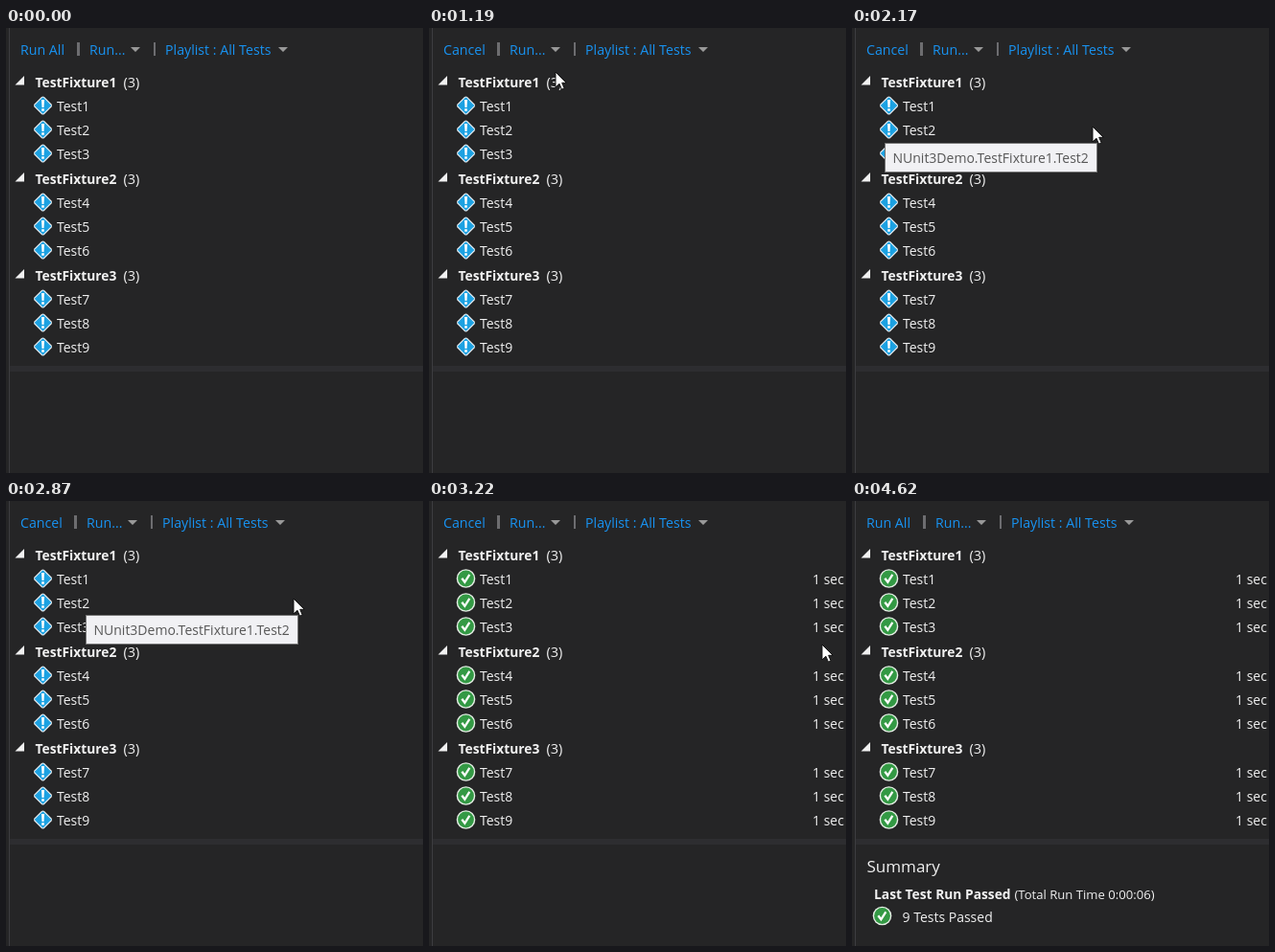
An HTML page that plays this animation: 435x465 px, repeating every 5670 ms.

```html
<!DOCTYPE html>
<html lang="en">
<head>
<meta charset="utf-8">
<title>Test explorer</title>
<style>
html, body { margin: 0; width: 100%; height: 100%; overflow: hidden; background: #252526; }
svg { display: block; font: 14px "Open Sans", "Noto Sans", sans-serif; fill: #f1f1f1; }
.bold { font-weight: 700; font-size: 13.8px; }
.link { font-size: 14.2px; fill: #1893f2; }
.link.hover { fill: #fff; }
.grey { fill: #999; }
</style>
</head>
<body>
<svg width="435" height="465" viewBox="0 0 435 465">
  <defs>
    <g id="pending">
      <path d="M-1.5-9Q0-10 1.5-9L9-1.5Q10 0 9 1.5L1.5 9Q0 10-1.5 9L-9 1.5Q-10 0-9-1.5Z" fill="#e4eef4"/>
      <path d="M0-8.2 8.2 0 0 8.2-8.2 0Z" fill="#1ba1e2" stroke="#1ba1e2" stroke-linejoin="round"/>
      <path d="M-1.5-6h3L1 2h-2ZM-1.3 3.2h2.6v2.6h-2.6Z" fill="#fff"/>
    </g>
    <g id="passed">
      <circle r="9.8" fill="#e6efe6"/>
      <circle r="8.4" fill="#339944"/>
      <path d="M-4.2-.2-1.2 3.8 3.8-4.2" fill="none" stroke="#fff" stroke-width="2.3"/>
    </g>
  </defs>
  <rect width="435" height="465" fill="#252526"/>
  <rect x="3" width="1" height="465" fill="#3d3d40"/>
  <rect x="4" y="353" width="431" height="6" fill="#2d2d30"/>

  <text id="action" class="link" x="15" y="28"></text>
  <g id="menu">
    <path d="M74 15h3v14h-3ZM154 15h2v14h-2Z" fill="#6d6d70"/>
    <text class="link" x="87" y="28">Run...</text>
    <text class="link" x="166" y="28">Playlist : All Tests</text>
    <path class="grey" d="M130 20h10l-5 5ZM284 20h10l-5 5Z"/>
  </g>

  <g id="tree"></g>
  <g id="waiting"></g>
  <g id="results"></g>

  <g id="summary">
    <text x="15.5" y="388" font-size="17">Summary</text>
    <text class="bold" x="23" y="416">Last Test Run Passed</text>
    <text x="169.5" y="416" font-size="13.1">(Total Run Time 0:00:06)</text>
    <use href="#passed" x="31.5" y="433.5"/>
    <text x="52.5" y="440">9 Tests Passed</text>
  </g>

  <g id="tip">
    <rect x=".5" y=".5" width="221" height="30" fill="#f1f1f4" stroke="#767676"/>
    <text x="8.5" y="21" fill="#575757">NUnit3Demo.TestFixture1.Test2</text>
  </g>
  <path id="cursor" d="M0 0V16L4 12.3 6.5 18.2 9.2 17 6.7 11.3H11.3Z" fill="#fff" stroke="#111"/>
</svg>
<script>
const LOOP = 5670, STEP = 70;
const $ = id => document.getElementById(id);
const show = (id, on) => { $(id).style.display = on ? "" : "none"; };
const place = (id, x, y) => $(id).setAttribute("transform", `translate(${Math.round(x)} ${Math.round(y)})`);

// Pointer path: time, x, y
const path = [
  [70, 325, 441], [140, 290, 380], [350, 105, 100], [420, 64, 42], [490, 43, 16],
  [560, 43, 16], [630, 42, 15], [700, 42, 14],
  [910, 42, 14], [1050, 72, 24], [1400, 222, 80], [1540, 240, 89], [1750, 251, 103],
  [2800, 251, 103], [3010, 398, 101], [3080, 408, 137], [3150, 410, 150],
  [4200, 410, 150], [4270, 400, 170], [4480, 280, 368], [4550, 262, 452], [4620, 262, 480]
];

function pointer(t) {
  const i = path.findIndex(p => p[0] > t);
  if (i < 1) return null;
  const [t0, x0, y0] = path[i - 1], [t1, x1, y1] = path[i];
  const k = (t - t0) / (t1 - t0);
  return [x0 + (x1 - x0) * k, y0 + (y1 - y0) * k];
}

function buildTree() {
  let tree = "", waiting = "", results = "";
  for (let i = 0; i < 12; i++) {
    const y = 62 + Math.floor(25.25 * i), group = Math.floor(i / 4);
    if (i % 4 === 0) {
      tree += `<path d="M19 ${y - 12}v9.5h-9.5Z"/>
        <text class="bold" x="30.5" y="${y}">TestFixture${group + 1}</text>
        <text x="122.5" y="${y}" font-size="14.5">(3)</text>`;
    } else {
      tree += `<text x="53" y="${y}">Test${i - group}</text>`;
      waiting += `<use href="#pending" x="38.5" y="${y - 6}"/>`;
      results += `<use href="#passed" x="38.5" y="${y - 6}"/><text x="400" y="${y}">1 sec</text>`;
    }
  }
  $("tree").innerHTML = tree;
  $("waiting").innerHTML = waiting;
  $("results").innerHTML = results;
}

function tipOpacity(t) {
  if (t < 2100 || t >= 3150) return 0;
  return t < 2170 ? 0.5 : t < 3080 ? 1 : 0.75;
}

function draw(t) {
  const pos = pointer(t);
  show("cursor", pos);
  if (pos) place("cursor", ...pos);

  const running = t >= 770 && t < 3500;
  $("action").textContent = running ? "Cancel" : "Run All";
  $("action").classList.toggle("hover", !!pos && pos[0] < 62 && pos[1] < 32);
  place("menu", running ? -3 : 0, 0);

  const done = t >= 3220;
  show("waiting", !done);
  show("results", done);
  show("summary", t >= 3570);

  // The tooltip trails the pointer, then stays put while it fades
  const [x, y] = pointer(Math.min(Math.max(t, 2100), 3010));
  place("tip", x - 217, y + 17);
  $("tip").setAttribute("opacity", tipOpacity(t));
}

buildTree();
const start = performance.now();
function tick() {
  const t = (performance.now() - start) % LOOP;
  draw(Math.floor(t / STEP) * STEP);
  requestAnimationFrame(tick);
}
tick();
</script>
</body>
</html>
```
